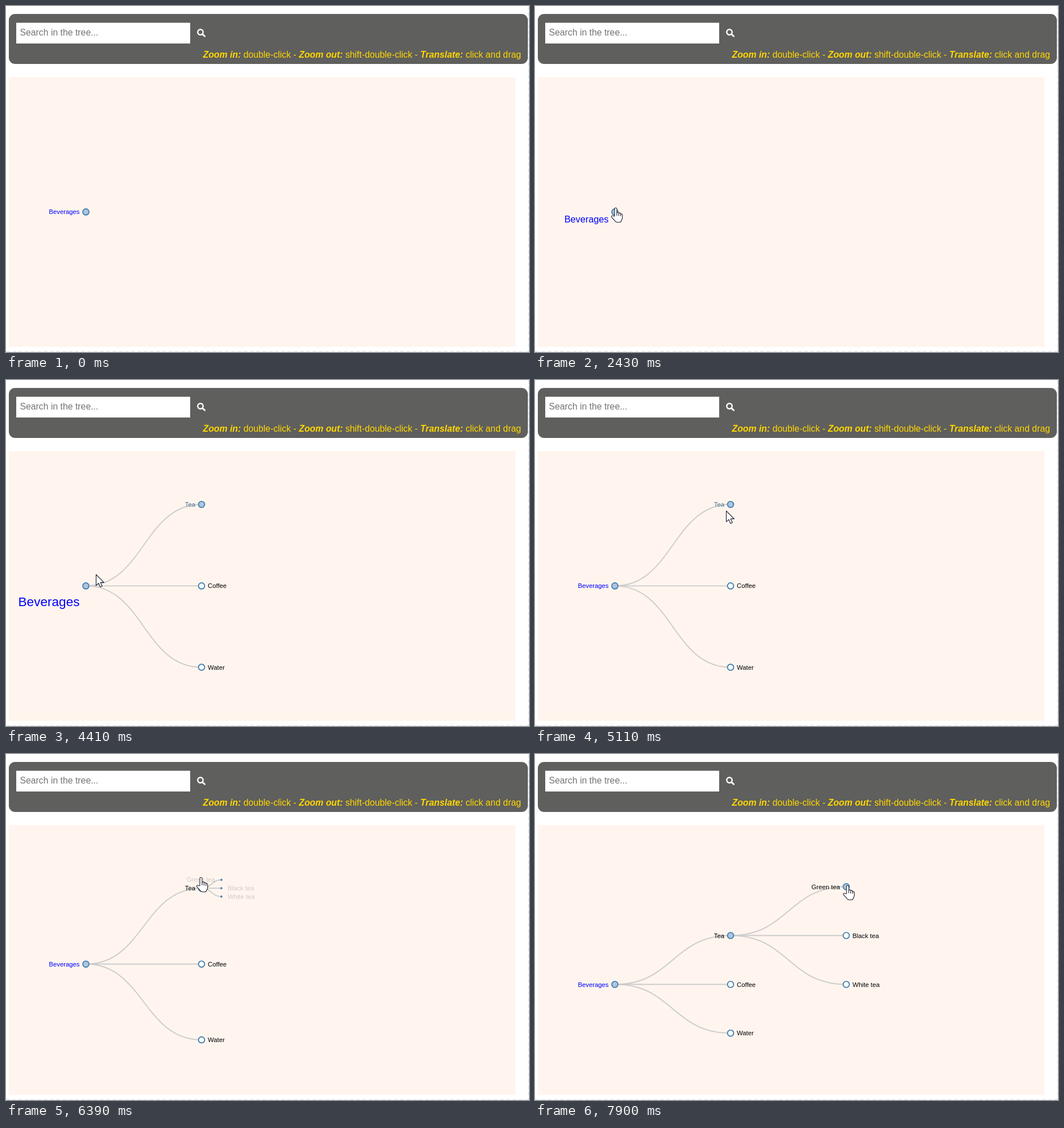
An HTML page that plays this animation: 920 px wide and 609 px high, repeating every 8000 ms.

```html
<!DOCTYPE html>
<html lang="en">
<head>
<meta charset="utf-8">
<title>Collapsible tree</title>
<style>
  html, body { margin: 0; width: 100%; height: 100%; overflow: hidden; background: #fff; }
  svg { display: block; width: 100%; height: 100%; }
  text { font-family: "Liberation Sans", Arial, sans-serif; }
  .hint { font-size: 15.82px; fill: #ffd700; text-anchor: end; }
  .hint tspan { font-weight: bold; font-style: italic; }
  .link { fill: none; stroke: #ccc; stroke-width: 1.9; }
  .node circle { stroke: #4682b4; stroke-width: 1.9; }
  .edge { stroke: #dcdcdc; stroke-dasharray: 7 4; }
  .cursor path { fill: #fff; stroke: #1c1c2c; stroke-width: 1.1; stroke-linejoin: round; }
  #glow { fill: #ffff70; mix-blend-mode: multiply; }
</style>
</head>
<body>
<svg viewBox="0 0 920 609">
  <rect width="920" height="609" fill="#fff"/>
  <rect x="5" y="14" width="913" height="88" rx="11" fill="#5f5f5d"/>
  <rect x="18" y="29.5" width="306" height="36.5" fill="#fff"/>
  <text x="24.5" y="52" font-size="15.8" fill="#757575">Search in the tree...</text>
  <g fill="none" stroke="#fff" stroke-width="2.4">
    <circle cx="342" cy="46" r="4.7"/>
    <path d="M345.6 49.6L349.6 53.2" stroke-width="2.8" stroke-linecap="round"/>
  </g>
  <text class="hint" x="906" y="91"><tspan>Zoom in:</tspan> double-click - <tspan>Zoom out:</tspan> shift-double-click - <tspan>Translate:</tspan> click and drag</text>
  <rect x="5" y="125" width="891" height="475" fill="#fff5ee"/>
  <path class="edge" d="M0 608.5H920M919.5 0V609"/>
  <g id="links"></g>
  <g id="nodes"></g>
  <circle id="glow" r="15"/>
  <g id="arrow" class="cursor">
    <path d="M.5 .5V19.6L4.8 15.6L8 22.4L11.2 21L8.1 14.4H14.3Z"/>
  </g>
  <g id="hand" class="cursor">
    <path d="M-1 16V3.2a2 2 0 0 1 4 0V10.5c.2-2.2 3.2-2.2 3.4 0v.9c.2-1.9 3.2-1.7 3.3.5v1c.3-1.6 3-1.3 3 .9V19c0 2-1.5 4-2 5.5c-.6 1.8-1.5 2.2-3 2.2H4c-2 0-3.2-.6-4-2L-6.3 17.6c-1-1.8 1-3.3 2.7-2.1Z"/>
    <path d="M3 10.5V15M6.4 11.4V15.4M9.7 12.9V16"/>
  </g>
</svg>
<script>
const LOOP = 8000, STEP = 70, FONT = 11.3;
const $ = id => document.getElementById(id);

// Each burst of motion advances in fixed steps from its start.
const BURSTS = [0, 990, 1660, 3250, 3450, 4410, 5990, 6250, 7200];
const CLICKS = [[3250, 3450, 141, 359], [5990, 6250, 342, 216]];
const HOVERS = [[2010, 4400], [5320, 6460], [7800, LOOP]];

// Pointer keys: time, x, y
const PATH = [
  [990, 490, 584], [1060, 322, 500], [1130, 204, 437], [1590, 204, 437],
  [1660, 167, 401], [1800, 152, 381], [2010, 142, 364], [2430, 141, 354],
  [2500, 141, 352], [2850, 141, 359], [4340, 141, 359], [4410, 158, 342],
  [4760, 268, 272], [5040, 331, 234], [5110, 336, 230], [5180, 338, 229],
  [5320, 341, 221], [5530, 343, 214], [5730, 342, 216], [7130, 342, 216],
  [7200, 352, 217], [7550, 470, 224], [7830, 546, 230], [7900, 549, 230]
];

const X = [140.5, 344, 547.5];
// Name, depth, parent index, y before and after the second expansion, has children
const NODES = [
  ["Beverages", 0, -1, 362.4, 405.5, true],
  ["Tea", 1, 0, 219, 319.5, true],
  ["Coffee", 1, 0, 362.4, 405.5],
  ["Water", 1, 0, 505.6, 491.3],
  ["Green tea", 2, 1, 219, 233.5, true],
  ["Black tea", 2, 1, 219, 319.5],
  ["White tea", 2, 1, 219, 405.5]
].map(([name, depth, parent, y0, y1, inner]) => ({ name, depth, parent, y0, y1, inner }));

function add(parent, tag, attrs = {}) {
  const el = document.createElementNS("http://www.w3.org/2000/svg", tag);
  set(el, attrs);
  return parent.appendChild(el);
}
function set(el, attrs) {
  for (const key in attrs) el.setAttribute(key, attrs[key]);
}
const show = (el, on) => set(el, { visibility: on ? "visible" : "hidden" });
const mix = (a, b, p) => a + (b - a) * p;

function ease(t, start, length) {
  const p = Math.min(1, Math.max(0, (t - start) / length));
  return p < 0.5 ? 4 * p ** 3 : 1 - 4 * (1 - p) ** 3;
}

for (const n of NODES) {
  if (n.depth) n.link = add($("links"), "path", { class: "link" });
  n.group = add($("nodes"), "g", { class: "node" });
  n.circle = add(n.group, "circle", { fill: n.inner ? "#b0c4de" : "#fff" });
  n.text = add(n.group, "text", {
    x: n.inner ? -11 : 11, y: 4, "font-size": FONT,
    "text-anchor": n.inner ? "end" : "start", fill: n.depth ? "#000" : "#00f"
  });
  n.text.textContent = n.name;
}

function stepTime(t) {
  const start = BURSTS.filter(b => b <= t).pop();
  return start + Math.floor((t - start) / STEP) * STEP;
}

function pointer(t) {
  const i = PATH.findIndex(k => k[0] > t);
  if (i < 0) return PATH[PATH.length - 1].slice(1);
  const a = PATH[Math.max(0, i - 1)], b = PATH[i];
  const p = Math.max(0, (t - a[0]) / (b[0] - a[0] || 1));
  return [mix(a[1], b[1], p), mix(a[2], b[2], p)];
}

function drawTree(t) {
  const open = [1, ease(t, 3465, 500), ease(t, 6215, 500)];
  const root = NODES[0];
  for (const n of NODES) {
    const p = open[n.depth], from = NODES[n.parent] || n;
    n.x = n.depth ? mix(X[n.depth - 1], X[n.depth], p) : X[0];
    n.y = mix(n.depth === 1 ? mix(root.y0, n.y0, p) : n.y0, n.y1, open[2]);
    show(n.group, p > 0);
    set(n.group, { transform: `translate(${n.x} ${n.y})` });
    set(n.circle, { r: 5.4 * p });
    set(n.text, { "fill-opacity": p });
    if (n.link) {
      const mid = (from.x + n.x) / 2;
      show(n.link, p > 0);
      set(n.link, { d: `M${from.x} ${from.y}C${mid} ${from.y} ${mid} ${n.y} ${n.x} ${n.y}` });
    }
  }
  set(NODES[1].text, { fill: t < 6250 ? "#4a7090" : "#000" });
  const big = ease(t, 2070, 750) - ease(t, 4400, 750);
  set(root.text, { "font-size": FONT * (1 + big), y: mix(4, 36, big) });
}

function drawPointer(t) {
  const [x, y] = pointer(t);
  const over = HOVERS.some(([a, b]) => t >= a && t < b);
  const move = { transform: `translate(${x} ${y})` };
  set($("arrow"), move);
  set($("hand"), move);
  show($("arrow"), t >= 990 && !over);
  show($("hand"), over);
  const click = CLICKS.find(([a, b]) => t >= a && t < b);
  show($("glow"), click);
  if (click) set($("glow"), { cx: click[2], cy: click[3] });
}

function draw(now) {
  const t = stepTime(now % LOOP);
  drawTree(t);
  drawPointer(t);
}

const began = performance.now();
function tick() {
  draw(performance.now() - began);
  requestAnimationFrame(tick);
}
tick();
</script>
</body>
</html>
```
